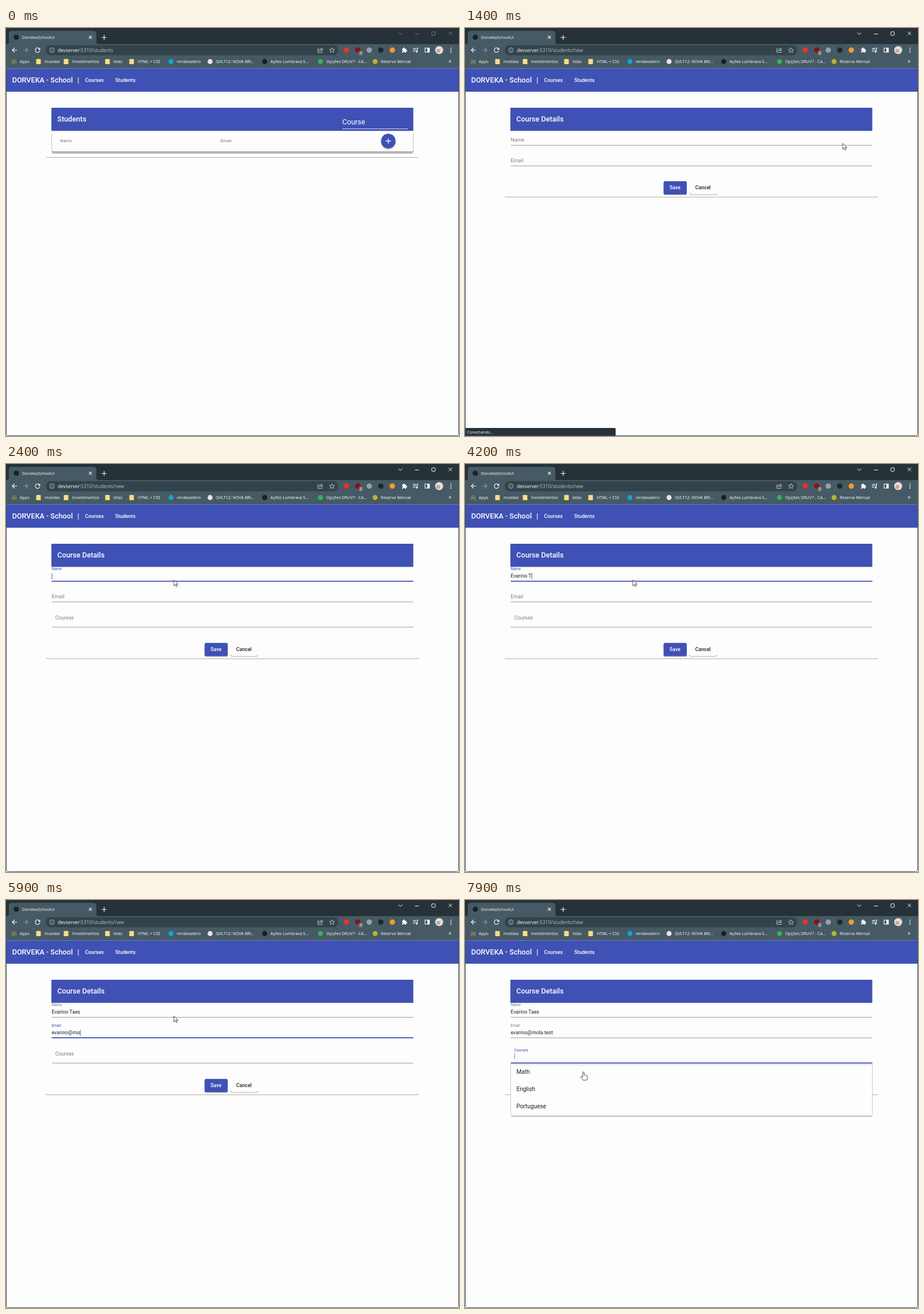
These frames come from a looping animation (788x711 px, 8 s). An HTML page:

```html
<!DOCTYPE html>
<html lang="en">
<head>
<meta charset="utf-8">
<title>Student form</title>
<style>
  html, body { margin: 0; width: 100%; height: 100%; overflow: hidden; background: #fdfdfd; }
  svg { display: block; width: 788px; height: 711px; font-family: Roboto, sans-serif; }
  text { white-space: pre; }
  .ui { font: 7.15px "Open Sans", sans-serif; fill: #fff; }
  .title { font-size: 12.6px; font-weight: 500; fill: #fff; }
  .nav { font-size: 8.8px; font-weight: 500; fill: #fff; }
  .head { font-size: 7.55px; fill: #757575; }
  .value { font-size: 8.8px; fill: #212121; }
  .option { font-size: 10.1px; fill: #212121; }
  .icon { fill: none; stroke: #fff; stroke-width: 1.1; }
</style>
</head>
<body>
<svg viewBox="0 0 788 711">
  <defs>
    <path id="folder" d="M0 1q0-1 1-1h6q1 0 1 1v8H1q-1 0-1-1z" fill="#fbdc82"/>
  </defs>

  <!-- browser window -->
  <rect width="788" height="711" fill="#fdfdfd"/>
  <rect width="788" height="30" fill="#263238"/>
  <path d="M1 28q4 0 4-4V10q0-5 5-5h142q5 0 5 5v14q0 4 4 4h627v42.5H0V28z" fill="#455a64"/>
  <rect x="69" y="30" width="509" height="17.5" rx="8.7" fill="#33434b"/>
  <circle cx="18" cy="16" r="4.6" fill="#1b2226"/>
  <text class="ui" x="28" y="18.7">DorvekaSchoolUi</text>
  <path class="icon" d="M144.3 13.7l5 5m0-5l-5 5M166.500 16.500h8.400m-4.200-4.200v8.400"/>
  <g id="controls" fill="none">
    <path d="M682.500 8l3.500 3.500 3.500-3.500M711.500 10.500h7M770 6.500l6 6m0-6l-6 6"/>
    <rect x="740.7" y="6.700" width="6" height="6" rx="1"/>
  </g>
  <path class="icon" d="M19 38.500h-8m4-4l-4 4 4 4M58.400 36.500a4 4 0 1 0 .4 3.200m.2-5v2.700h-2.800"/>
  <path class="icon" style="stroke:#8a999f" d="M30 38.500h8m-4-4l4 4-4 4"/>
  <g class="icon" style="stroke:#d5dcdf;stroke-width:.8">
    <circle cx="80" cy="38.500" r="4"/><path d="M80 38v2.700m0-4.500v.9"/>
    <path d="M544.500 36h-2v6.500h7.500v-2M544.500 40q.5-3.500 4-3.500v-2l3 2.800-3 2.700v-1.700q-2.500 0-4 1.700"/>
    <path d="M567 34.300l1.300 2.800 3.100.3-2.300 2.100.7 3.100-2.800-1.700-2.800 1.700.7-3.100-2.300-2.100 3.100-.3z"/>
  </g>
  <text class="ui" x="90" y="41.600" style="font-size:8.33px">devserver:<tspan id="path" fill="#b8c3c8"></tspan></text>

  <g id="extensions"></g>
  <rect x="613.500" y="40" width="7" height="7.500" rx="1.500" fill="#6b7478"/>
  <text class="ui" x="615.200" y="46.300" style="font-size:6.5px">3</text>
  <path d="M689 36h2q-.5-2 1.200-2t1.200 2h2.600v2.300q1.800-.4 1.800 1.200t-1.800 1.200V43h-2.500q.2-1.700-1.300-1.700T691 43h-2v-2.300q1.500 0 1.500-1.200T689 38.300z" fill="#fff"/>
  <path class="icon" d="M708 35.500h6m-6 2.500h6m-6 2.500h3.500M717.500 35h-2v6"/>
  <circle cx="714.300" cy="41.200" r="1.500" fill="#fff"/>
  <rect class="icon" x="729" y="35" width="7.500" height="7"/><path d="M733 35h3.500v7H733z" fill="#fff"/>
  <circle cx="753.500" cy="38.500" r="7" fill="#e5dcd5"/><circle cx="752" cy="40" r="3.200" fill="#c9a596"/>
  <g fill="#fff"><circle cx="774" cy="35.300" r="1"/><circle cx="774" cy="38.700" r="1"/><circle cx="774" cy="42.100" r="1"/></g>
  <g id="bookmarks"></g>
  <text class="ui" x="770" y="61" style="font-size:10px">»</text>

  <!-- page header -->
  <rect y="70.500" width="788" height="40.500" fill="#3f51b5"/>
  <text class="title" x="10.700" y="95">DORVEKA - School</text>
  <text class="title" x="124.300" y="95">|</text>
  <text class="nav" x="137.500" y="93.500">Courses</text>
  <text class="nav" x="190" y="93.500">Students</text>
  <rect x="79" y="139" width="629.500" height="40.300" fill="#3f51b5"/>
  <text id="heading" class="title" x="89.300" y="163.400"></text>

  <g id="list">
    <path d="M79.500 184v30q0 4 4 4h621q4 0 4-4v-30" fill="none" stroke="#c4c4c4"/>
    <path d="M79.500 212q0 3.500 4 3.500h621q4 0 4-3.500v3q0 4-4 4h-621q-4 0-4-4z" fill="#b9b9b9"/>
    <path d="M80 215.500h628" stroke="#8f8f8f" stroke-width=".8"/>
    <path d="M70.500 225.500h647" stroke="#adadad"/>
    <text x="585" y="167.700" font-size="12.6" fill="#fff">Course</text>
    <path d="M585 175.700h114" stroke="#e8eaf6" stroke-width=".9"/>
    <text class="head" x="94.300" y="199.400">Name</text>
    <text class="head" x="373.300" y="199.400">Email</text>
    <circle cx="665" cy="199" r="12.700" fill="#bdbdbd"/>
    <circle cx="665" cy="197" r="12.700" fill="#3f51b5"/>
    <path d="M660.500 197h9m-4.500-4.500v9" stroke="#fff" stroke-width="1.300"/>
  </g>

  <g id="form">
    <g id="fields"></g>
    <g id="actions">
      <rect x="345.500" y="268.300" width="40.200" height="23" rx="2.500" fill="#b5b5b5"/>
      <rect x="345.500" y="267" width="40.200" height="23" rx="2.500" fill="#3f51b5"/>
      <text class="nav" x="355.700" y="281">Save</text>
      <path d="M391 287.500q0 3 2.500 3h42q2.500 0 2.500-3" fill="none" stroke="#b0b0b0" stroke-width="1.100"/>
      <text class="nav" x="400.400" y="281" style="fill:#212121">Cancel</text>
      <path d="M69.500 293q0 1.700 2.500 1.700h644q2.500 0 2.500-1.700" fill="none" stroke="#adadad"/>
    </g>
    <g id="menu">
      <path d="M79.500 287v86q0 4 3 4h623q3 0 3-4v-86z" fill="#fdfdfd" stroke="#c8c8c8"/>
      <path d="M81 376.500h626" stroke="#b5b5b5" stroke-width="1.500"/>
      <text class="option" x="89.400" y="302.900">Math</text>
      <text class="option" x="89.400" y="333.100">English</text>
      <text class="option" x="89.400" y="363.300">Portuguese</text>
    </g>
    <path id="caret" stroke="#333" stroke-width=".8"/>
  </g>

  <g id="status">
    <path d="M0 697h260q2 0 2 2v12H0z" fill="#263238"/>
    <text class="ui" x="3.500" y="706.500">Conectando...</text>
  </g>
  <path d="M.5 70V706q0 4.500 4 4.500h779q4 0 4-4.500V70" fill="none" stroke="#2c5268"/>

  <g id="cursor" stroke="#222" stroke-width=".8" stroke-linejoin="round" fill="#fff">
    <path id="arrow" d="M0 0v10.300l2.400-2.200 1.700 3.700 1.700-.8-1.600-3.500h3.200z"/>
    <path id="hand" d="M-1.200 1q0-1.300 1.200-1.300T1.200 1v4q1.200-.7 2 .3 1.200-.5 1.900.5 1.700-.3 1.700 1.400v3q0 1.800-1.200 3.800H-.8q-1-2.200-3.300-4.700-1-1.400.2-1.900 1-.3 2.700 1.600z"/>
  </g>
</svg>

<script>
const LOOP = 8000, STEP = 100;
const BLUE = [63, 81, 181], GREY = [125, 125, 125];
const $ = id => document.getElementById(id);
const clamp = v => Math.max(0, Math.min(1, v));
const lerp = (a, b, k) => a + (b - a) * k;
const mix = (a, b, k) => `rgb(${a.map((v, i) => Math.round(lerp(v, b[i], k)))})`;
const show = (id, on) => $(id).setAttribute('visibility', on ? 'inherit' : 'hidden');

function add(parent, tag, attrs, text = '') {
  const node = document.createElementNS(parent.namespaceURI, tag);
  for (const key in attrs) node.setAttribute(key, attrs[key]);
  node.textContent = text;
  return parent.appendChild(node);
}

const dot = (parent, x, y, r, fill) => add(parent, 'circle', { cx: x, cy: y, r, fill });

[[592, '#e8322b'], [612, '#8c1018'], [632, '#93a3a9'], [652, '#1d282e'], [672, '#f39a2b']]
  .forEach(([x, fill]) => dot($('extensions'), x, 38.5, 4.7, fill));

// Bookmark bar: text position, label and icon colour (folder when absent)
const bar = $('bookmarks');
for (let i = 0; i < 9; i++) {
  const fill = ['#ea4335', '#fbbc04', '#4caf50', '#64a1f4'][(i * 2 + (i / 3 | 0)) % 4];
  add(bar, 'rect', { x: 10 + i % 3 * 3.1, y: 54.8 + (i / 3 | 0) * 3.1, width: 2, height: 2, fill });
}
[[24, 'Apps', 'none'], [67, 'moedas'], [115, 'Investimentos'], [187, 'telas'], [229, 'HTML + CSS'],
 [297, 'rendavaleiro', '#199fd8'], [365, 'QVLT12: NOVA BRI...', '#eee1e1'],
 [460, 'Ações Lumbrava S...', '#1c1c1c'], [557, 'Opções DRUV7 - CA...', '#31b45a'],
 [652, 'Reserva Mensal', '#b8b52c']].forEach(([x, label, fill]) => {
  if (fill) dot(bar, x - 10, 58.5, 4.4, fill);
  else add(bar, 'use', { href: '#folder', x: x - 14.5, y: 54 });
  add(bar, 'text', { class: 'ui', x, y: 61.2 }, label);
});

// Each key time reveals one more character; repeated times reveal several
const fields = [
  { label: 'Name', x: 79.5, base: 198.3, up: 184.9, line: 204.4, caret: 190.3,
    focus: 2150, blur: 4800, value: 'Evarino Taes',
    keys: [3100, 3300, 3500, 3600, 3700, 3800, 3800, 4000, 4200, 4300, 4500, 4600] },
  { label: 'Email', x: 79.5, base: 234.3, up: 220.7, line: 240.2, caret: 226.2,
    focus: 4800, blur: 6800, value: 'evarino@mola.test',
    keys: [4900, 5000, 5100, 5200, 5300, 5400, 5500, 5700, 5800, 5900,
           6100, 6200, 6300, 6400, 6500, 6600, 6600] },
  { label: 'Courses', x: 85.8, base: 270.8, up: 263.7, line: 284.2, caret: 267.2,
    focus: 6800, blur: LOOP, value: '', keys: [] }
];
for (const f of fields) {
  f.group = add($('fields'), 'g', {});
  add(f.group, 'path', { d: `M79.500 ${f.line}h629`, stroke: '#9a9a9a' });
  f.ripple = add(f.group, 'path', { 'stroke-width': 1.8 });
  f.labelNode = add(f.group, 'text', { 'font-size': 8.8 }, f.label);
  f.text = add(f.group, 'text', { class: 'value', x: f.x, y: f.base });
}

const floatAt = ms => ms < 0 ? 0 : [0.53, 0.9, 1][Math.min(2, Math.floor(ms / STEP))];

function drawField(f, t) {
  const focused = t >= f.focus && t < f.blur;
  const k = floatAt(t - f.focus);
  const scale = lerp(1, 0.75, k);
  f.labelNode.setAttribute('transform', `translate(${f.x} ${lerp(f.base, f.up, k)}) scale(${scale})`);
  f.labelNode.setAttribute('fill', focused ? mix(GREY, BLUE, k) : mix(GREY, GREY, 0));

  const half = 314.5 * (k < 0.6 ? 0.85 : 1);
  f.ripple.setAttribute('d', `M${394 - half} ${f.line}h${half * 2}`);
  f.ripple.setAttribute('stroke', mix([90, 95, 130], BLUE, k < 0.6 ? 0.5 : 1));
  f.ripple.setAttribute('visibility', focused ? 'inherit' : 'hidden');

  const typed = f.keys.filter(key => key <= t);
  f.text.textContent = f.value.slice(0, typed.length);
  if (!focused) return;
  const since = t - (typed.length ? typed[typed.length - 1] : f.focus);
  const x = f.x + 0.5 + (typed.length ? f.text.getComputedTextLength() : 0);
  $('caret').setAttribute('d', `M${x} ${f.caret}v10.300`);
  $('caret').setAttribute('stroke', f.value ? '#333' : '#3f51b5');
  show('caret', Math.floor(since / 530) % 2 === 0);
}

// Pointer moves: start, end, from, to
const moves = [
  [400, 1100, 62, 39, 660, 199],
  [1300, 1400, 660, 199, 657, 201],
  [1600, 2000, 657, 201, 292, 202],
  [7300, 7900, 292, 202, 206, 300]
];

function drawCursor(t) {
  const [start, end, x0, y0, x1, y1] = moves.filter(m => m[0] <= t).pop() || moves[0];
  const p = clamp((t - start) / (end - start));
  const k = p * p * (3 - 2 * p);
  const x = lerp(x0, x1, k), y = lerp(y0, y1, k);
  const link = (t < 1400 && x > 652) || (t > 6800 && y > 287);
  $('cursor').setAttribute('transform', `translate(${x} ${y})`);
  show('cursor', t >= 400);
  show('arrow', !link);
  show('hand', link);
}

function draw(t) {
  const editing = t >= 1400, loaded = t >= 1700;
  $('controls').setAttribute('stroke', t >= 1300 ? '#fff' : '#73828a');
  $('path').textContent = '5310/students' + (editing ? '/new' : '');
  $('heading').textContent = editing ? 'Course Details' : 'Students';
  show('list', !editing);
  show('form', editing);
  show('status', editing && !loaded);
  show('menu', t >= 6800);
  show('caret', false);
  $('actions').setAttribute('transform', `translate(0 ${loaded ? 44.7 : 0})`);
  fields[2].group.setAttribute('visibility', loaded ? 'inherit' : 'hidden');
  fields.forEach(f => drawField(f, t));
  drawCursor(t);
}

const origin = performance.now();
function tick() {
  const t = (performance.now() - origin) % LOOP;
  draw(Math.floor(t / STEP) * STEP);
  requestAnimationFrame(tick);
}
tick();
</script>
</body>
</html>
```
